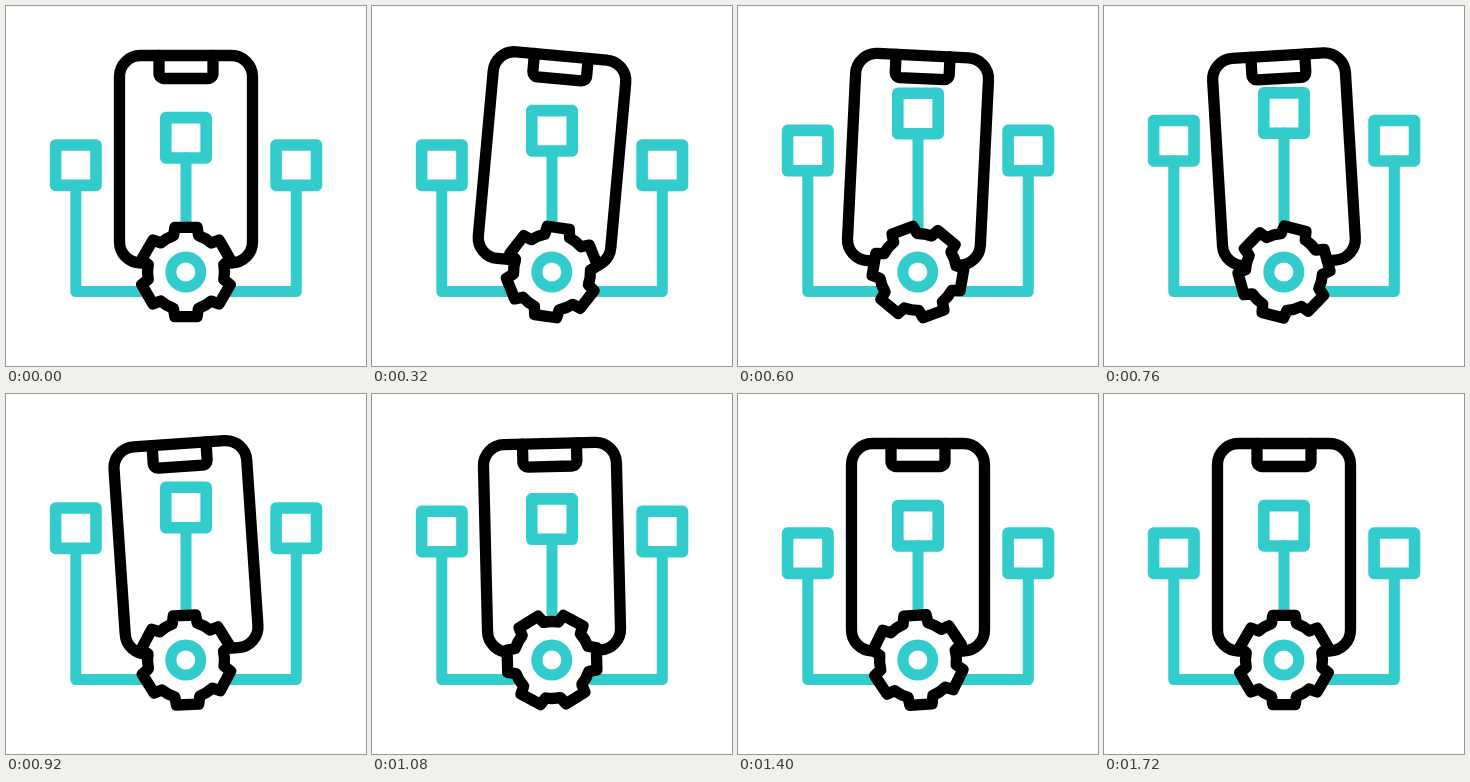
Write an HTML page that moves like this. It is 360 px wide and 360 px high and loops after 2000 ms.

```html
<!DOCTYPE html>
<html lang="en">
<head>
<meta charset="utf-8">
<title>Connected phone</title>
<style>
  html, body { margin: 0; width: 100%; height: 100%; overflow: hidden; background: #fff; }
  svg { display: block; width: 100vw; height: 100vh; }
  path, rect, circle { fill: none; stroke: #000; stroke-width: 11.3; stroke-linejoin: round; stroke-linecap: round; }
  .teal { stroke: #33cccc; stroke-width: 11; }
  .box { stroke-width: 11.6; }
  #gear { fill: #fff; }
</style>
</head>
<body>
<svg viewBox="0 0 360 360">
  <g id="phone">
    <rect x="113.5" y="49.5" width="133" height="207.5" rx="21"/>
    <path d="M153 49.5V67.5a5 5 0 0 0 5 5H202a5 5 0 0 0 5 -5V49.5"/>
  </g>
  <path id="wires" class="teal"/>
  <path id="boxes" class="teal box"/>
  <path id="gear"/>
  <circle class="teal" cx="179.8" cy="266" r="15"/>
</svg>
<script>
const LOOP = 2000, STEP = 40;
const $ = id => document.getElementById(id);
const progress = (t, from, to) => Math.min(1, Math.max(0, (t - from) / (to - from)));

function ease(t, from, to) {
  const p = progress(t, from, to);
  return p * p * p * (p * (6 * p - 15) + 10);
}

function easeCubic(t, from, to) {
  const p = progress(t, from, to);
  return p < 0.5 ? 4 * p ** 3 : 1 - 4 * (1 - p) ** 3;
}

function gearPath(teeth, inner, outer) {
  const point = (deg, r) => {
    const a = deg * Math.PI / 180;
    return `${(180 + r * Math.sin(a)).toFixed(2)} ${(266 - r * Math.cos(a)).toFixed(2)}`;
  };
  let d = "";
  for (let i = 0; i < teeth; i++) {
    const a = i * 360 / teeth;
    d += i ? `A${inner} ${inner} 0 0 1 ` : "M";
    d += `${point(a - 19, inner)}L${point(a - 14, outer)}L${point(a + 14, outer)}L${point(a + 19, inner)}`;
  }
  return d + `A${inner} ${inner} 0 0 1 ${point(-19, inner)}Z`;
}

const box = (x, y) => `M${x - 20.2} ${y - 20.2}h40.4v40.4h-40.4z`;

function draw(t) {
  const tilt = 5.6 * ease(t, 40, 400) - 9.6 * ease(t, 450, 840) + 4 * ease(t, 860, 1240);
  const middle = 131.8 - 25 * (ease(t, 95, 690) - ease(t, 690, 1310));
  const side = 159.2 - 25 * (ease(t, 325, 830) - ease(t, 955, 1410));
  const spin = 180 * easeCubic(t, -85, 1715);

  $("phone").setAttribute("transform", `rotate(${tilt} 180 153.5)`);
  $("gear").setAttribute("transform", `rotate(${spin} 180 266)`);
  $("boxes").setAttribute("d", box(69.8, side) + box(180, middle) + box(290.3, side));
  $("wires").setAttribute("d",
    `M69.8 ${side + 20}V285.5H140M290.3 ${side + 20}V285.5H220M180 ${middle + 20}V222`);
}

function tick(now) {
  draw(Math.floor(now % LOOP / STEP) * STEP);
  requestAnimationFrame(tick);
}

$("gear").setAttribute("d", gearPath(6, 38.5, 46));
draw(0);
requestAnimationFrame(tick);
</script>
</body>
</html>
```
